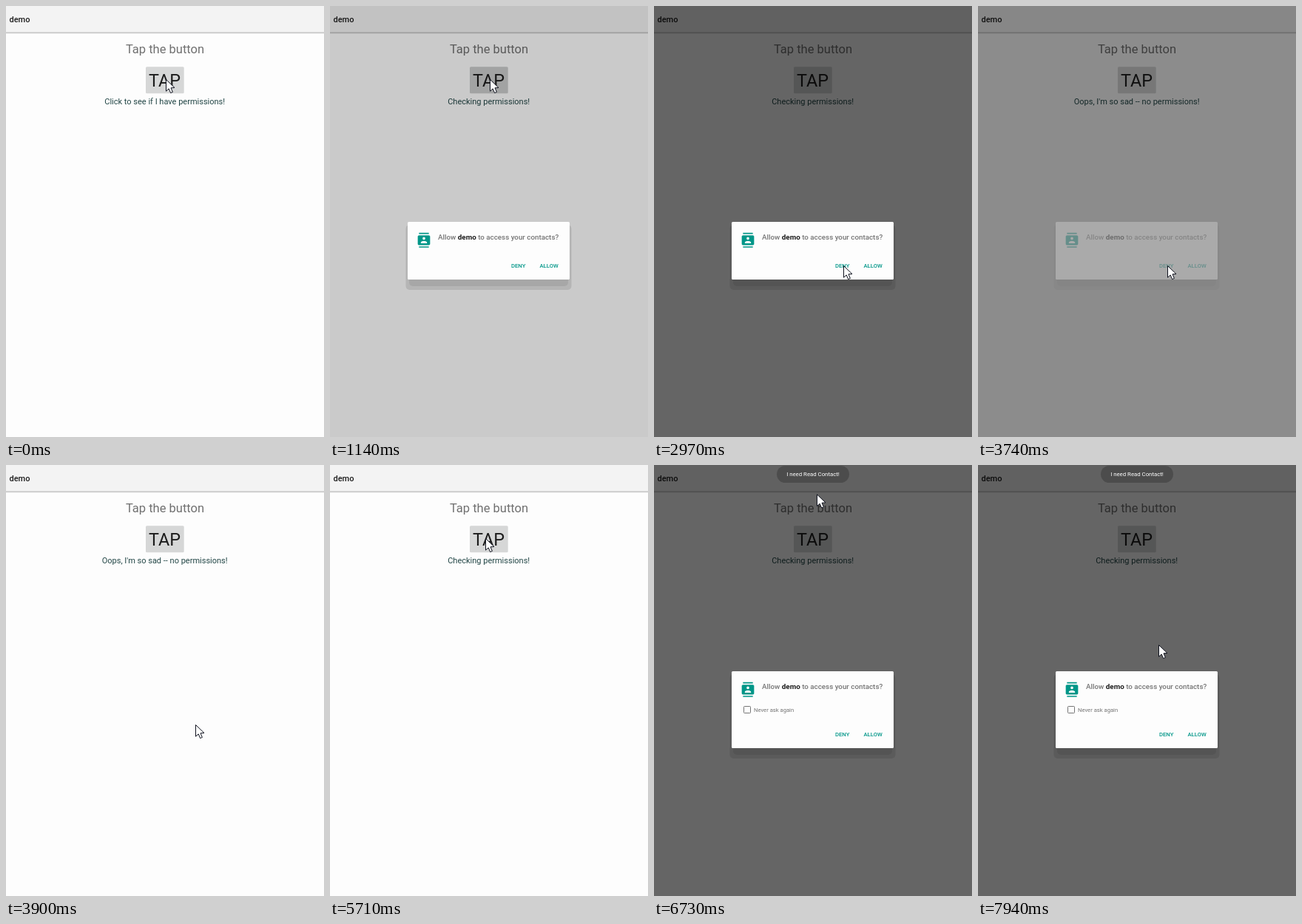
These frames come from a looping animation (430x583 px, 7990 ms). An HTML page:

```html
<!DOCTYPE html>
<html lang="en">
<head>
<meta charset="utf-8">
<title>Permission demo</title>
<style>
  html, body { margin: 0; width: 100%; height: 100%; overflow: hidden; background: #fdfdfd; }
  svg { display: block; width: 430px; height: 583px; font-family: Roboto, Arial, sans-serif; }
  .mid { text-anchor: middle; }
  .msg { font-size: 11px; fill: #224646; }
  .ask { font-size: 9.8px; font-weight: 500; fill: #757575; }
  .ask tspan { fill: #1c1c1c; font-weight: 700; }
  .act { font-size: 7.7px; font-weight: 500; fill: #009688; }
  .never { font-size: 7.65px; fill: #757575; }
  .toast { font-size: 7.8px; fill: #fff; }
</style>
</head>
<body>
<svg viewBox="0 0 430 583">
  <rect width="430" height="583" fill="#fdfdfd"/>
  <rect width="430" height="35" fill="#f3f3f3"/>
  <rect y="35" width="430" height="1" fill="#d6d6d6"/>
  <rect y="36" width="430" height="1" fill="#cacaca"/>
  <rect y="37" width="430" height="1" fill="#f4f4f4"/>
  <text x="4.5" y="22" font-size="11" font-weight="500" fill="#1c1c1c">demo</text>
  <text class="mid" x="215" y="64" font-size="16.5" fill="#707070">Tap the button</text>

  <rect id="lift" x="190" y="117" width="49" height="2" fill="#c2c3c3"/>
  <rect x="189" y="82.3" width="51.7" height="35.9" rx="1.5" fill="#d6d7d7"/>
  <rect id="press" x="189" y="82.3" width="51.7" height="35.9" rx="1.5"/>
  <text class="mid" x="214.6" y="109.2" font-size="23.4" fill="#1c1c1c">TAP</text>
  <text id="status" class="mid msg" x="214.7" y="133"></text>

  <rect id="dim" width="430" height="583"/>
  <g id="first"></g>
  <g id="second"></g>

  <g id="toast">
    <rect x="166" y="1" width="98" height="23" rx="11.5" fill="#4c4c4c"/>
    <text class="mid toast" x="215" y="15.4">I need Read Contact!</text>
  </g>

  <path id="cursor" d="M.5 .5V16.2L4.2 12.9 6.6 18.6 9.4 17.4 7 11.8 12 11.5Z"
        fill="#fff" stroke="#10131f" stroke-linejoin="round"/>
</svg>
<script>
const LOOP = 7990;
const $ = id => document.getElementById(id);

const ICON = 'M20 0H4v2h16zM4 24h16v-2H4zM20 4H4c-1.1 0-2 .9-2 2v12c0 1.1.9 2 2 2h16' +
  'c1.1 0 2-.9 2-2V6c0-1.1-.9-2-2-2zm-8 2.75a2.25 2.25 0 1 1 0 4.5a2.25 2.25 0 1 1 0-4.5z' +
  'M17 17H7v-1.5c0-1.67 3.33-2.5 5-2.5s5 .83 5 2.5z';

function dialog(top, height, extra = '') {
  const shade = (x, y, grow, alpha) =>
    `<rect x="${x}" y="${y}" width="${429 - 2 * x}" height="${height + grow - y}" rx="5" opacity="${alpha}"/>`;
  const base = height - 16.4;
  return `<g transform="translate(0 ${top})">
    ${shade(102.5, 4, 14, .1)}${shade(107, 8, 9, .08)}
    <rect x="105" width="219" height="${height}" rx="1.5" fill="#fdfdfd"/>
    <path transform="translate(117 14.8) scale(.8333)" d="${ICON}" fill="#009688" fill-rule="evenodd"/>
    <text class="ask" x="146" y="24.3">Allow <tspan>demo</tspan> to access your contacts?</text>
    ${extra}
    <text class="act" x="245" y="${base}">DENY</text>
    <text class="act" x="283.5" y="${base}">ALLOW</text>
  </g>`;
}

$('first').innerHTML = dialog(292, 78);
$('second').innerHTML = dialog(279, 104,
  `<rect x="121.5" y="47.5" width="9" height="9" rx=".8" fill="none" stroke="#757575"/>
   <text class="never" x="135" y="55">Never ask again</text>`);

// Each glide is a quadratic curve from the last stop, bent towards `via`
const START = [216, 99];
const GLIDES = [
  { from: 1540, to: 1940, via: [234, 45], end: [251, 269] },
  { from: 2090, to: 2910, via: [332, 422], end: [256, 351] },
  { from: 4010, to: 4550, via: [222, 200], end: [209, 99] },
  { from: 4860, to: 4920, via: [209, 99], end: [210, 99] },
  { from: 6350, to: 6550, via: [217, 65], end: [220, 40] },
  { from: 6700, to: 7000, via: [220, 30], end: [220, 20] },
  { from: 7650, to: 7940, via: [220, 100], end: [244, 243] }
];

const ramp = (t, a, b) => Math.min(1, Math.max(0, (t - a) / (b - a)));
const smooth = u => u * u * (3 - 2 * u);
const within = (t, a, b) => t >= a && t < b;

function cursorAt(t) {
  let pos = START;
  for (const { from, to, via, end } of GLIDES) {
    if (t < from) break;
    const u = smooth(ramp(t, from, to)), v = 1 - u;
    pos = pos.map((p, i) => v * v * p + 2 * u * v * via[i] + u * u * end[i]);
  }
  return pos;
}

function statusAt(t) {
  if (t < 890) return 'Click to see if I have permissions!';
  if (within(t, 3700, 5710)) return "Oops, I'm so sad -- no permissions!";
  return 'Checking permissions!';
}

const ripple = (t, tap) => ramp(t, tap, tap + 40) - ramp(t, tap + 260, tap + 330);

function render(t) {
  const show = (id, alpha) => $(id).setAttribute('opacity', alpha);
  const status = statusAt(t);
  if ($('status').textContent !== status) $('status').textContent = status;

  show('lift', +(within(t, 500, 890) || within(t, 5530, 5710)));
  show('press', .05 * (ripple(t, 890) + ripple(t, 5710)));
  show('dim', .6 * (ramp(t, 1100, 1220) - ramp(t, 3690, 3890) + ramp(t, 5850, 5980)));
  show('first', ramp(t, 1050, 1130) - ramp(t, 3690, 3760));
  show('second', ramp(t, 5830, 5935));
  show('toast', ramp(t, 5870, 6060));
  $('cursor').setAttribute('transform', `translate(${cursorAt(t)})`);
}

const begin = performance.now();
function tick() {
  render((performance.now() - begin) % LOOP);
  requestAnimationFrame(tick);
}
tick();
</script>
</body>
</html>
```
